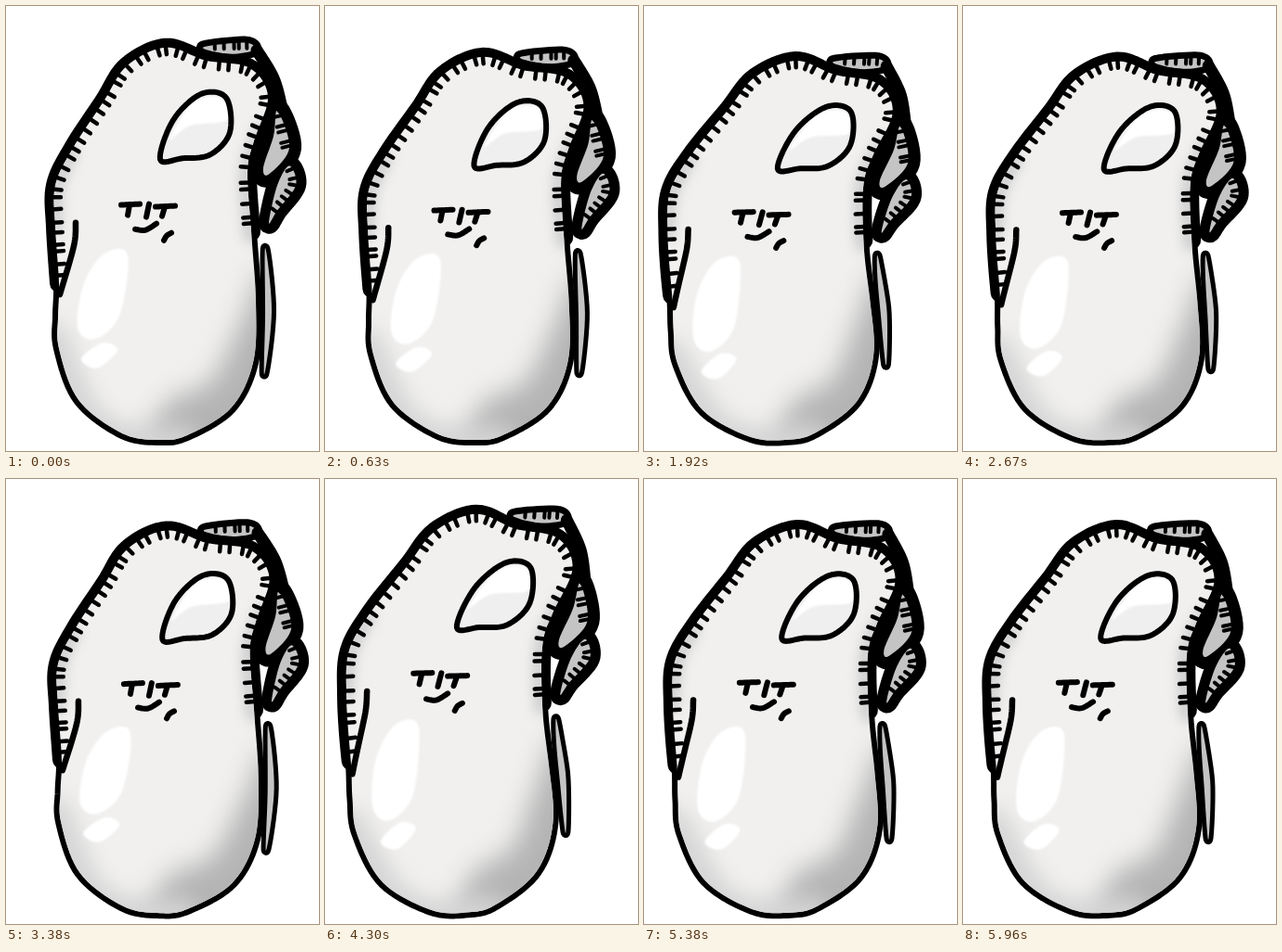
An HTML page with a canvas for the animation above (6000 ms loop, 337 px wide and 480 px high).

```html
<!DOCTYPE html>
<html lang="en">
<head>
<meta charset="utf-8">
<title>Dancing mitt</title>
<style>
html, body { margin: 0; height: 100%; overflow: hidden; background: #fff; }
canvas { display: block; }
</style>
</head>
<body>
<canvas id="stage" width="337" height="480"></canvas>
<script>
const ctx = document.getElementById('stage').getContext('2d');
const FPS = 24, LOOP = 6000, FLOOR = 474.5, TOP = 37.5, HIPS = 262;
let sway = 0, stretch = 1;

// The hips swing every 14 steps while the body bobs every 6.
function setPose(step) {
  sway = 18 * Math.cos((step - 12.2) * Math.PI / 7) - 12.4;
  const top = 40.5 + 10.8 * Math.cos((step - 4) * Math.PI / 3);
  stretch = (FLOOR - top) / (FLOOR - TOP);
}

// Bends the body like a soft beam; the upper half leans more than it turns.
function warp([x, y]) {
  const d = y - HIPS, w = 39200;
  const bend = Math.exp(-d * d / w);
  const turn = 2 * d / w * bend * (d < 0 ? 0.35 : 1);
  const turned = y + sway * turn * (x - 225 + 0.14 * y);
  return [x + sway * bend, FLOOR - (FLOOR - turned) * stretch];
}

// Catmull-Rom spline through "x,y x,y ..." as a dense list of points.
function spline(text, closed) {
  const p = text.trim().split(/\s+/).map(s => s.split(',').map(Number));
  const n = p.length, out = [];
  const at = i => closed ? p[(i + n) % n] : p[Math.max(0, Math.min(n - 1, i))];
  for (let i = 0; i < (closed ? n : n - 1); i++) {
    const [a, b, c, d] = [at(i - 1), at(i), at(i + 1), at(i + 2)];
    for (let t = 0; t < 1; t += 0.1) {
      out.push([0, 1].map(k => b[k] + 0.5 * t * (c[k] - a[k] +
        t * (2 * a[k] - 5 * b[k] + 4 * c[k] - d[k] +
        t * (3 * (b[k] - c[k]) + d[k] - a[k])))));
    }
  }
  if (!closed) out.push(p[n - 1]);
  return out;
}
const line = text => spline(text);
const shape = text => spline(text, true);

// Short stitches at right angles to a line, on its clockwise side.
function stitches(path, gap, len) {
  const out = [];
  let left = gap / 2;
  for (let i = 1; i < path.length; i++) {
    const [x, y] = path[i], dx = x - path[i - 1][0], dy = y - path[i - 1][1];
    const h = Math.hypot(dx, dy);
    left -= h;
    if (left < 0) {
      left += gap;
      out.push([[x + dy / h * 2, y - dx / h * 2], [x - dy / h * len, y + dx / h * len]]);
    }
  }
  return out;
}

function trace(path) {
  ctx.beginPath();
  path.forEach(p => ctx.lineTo(...warp(p)));
}
function fill(path, color) {
  trace(path);
  ctx.fillStyle = color;
  ctx.fill();
}
function stroke(path, width, color = '#000') {
  trace(path);
  ctx.lineWidth = width;
  ctx.strokeStyle = color;
  ctx.stroke();
}
function outline(path, width) {
  stroke([...path, path[0]], width);
}
function soft(radius, draw) {
  ctx.filter = `blur(${radius}px)`;
  draw();
  ctx.filter = 'none';
}

// The sewn part of the contour, then the smooth round bottom.
const sewn = `57,300 53,240 53,195 72,155 105,105 130,67 172,47 215,61 262,69
  282,100 267,147 260,180 264,245`;
const seam = line(sewn);
const body = shape(sewn + ` 269,320 266,385 242,434 195,463 165,468 125,461
  78,425 57,370 56,335`);
const bodyStitches = stitches(seam, 11.8, 7.5);

// Layers behind: [shape, width of the black border].
const layers = [
  [shape('212,47 258,42 267,50 240,54'), 7],
  [shape('292,115 305,155 283,183 277,176 288,142'), 13],
  [shape('305,174 312,195 292,222 283,235 292,195'), 11],
  [shape('279,262 286,330 278,398 279,335'), 5]
];
const fold = line('270,50 288,80 297,112');
const layerStitches = ['218,42 262,41', '294,113 306,160', '307,172 312,195 292,224']
  .flatMap(s => stitches(line(s), 9, 7));

const slit = line('75,235 73,260 58,312');
const shade = shape('285,290 252,345 220,405 172,430 160,490 310,490');
const rim = line('50,360 85,440 130,468 190,470');
const glows = [line('52,240 55,195 70,160'), line('263,250 259,180 275,135')];
const shine = shape('106,268 131,270 122,335 95,360 77,347 84,300');
const spot = shape('81,381 104,364 120,372 98,391');
const nail = shape('166,167 180,125 210,97 237,101 241,138 220,162 190,166');
const gloss = shape('176,146 202,106 233,102 238,125 198,131');
const face = [
  '124,216 144,215', '133,216 131,227', '154,215 151,229', '161,218 182,217',
  '171,218 168,228', '139,242 150,243 162,236', '178,246 173,249 170,254'
].map(line);

function draw() {
  ctx.fillStyle = '#fff';
  ctx.fillRect(0, 0, 337, 480);
  ctx.lineCap = ctx.lineJoin = 'round';

  layers.forEach(([path, border]) => outline(path, border * 2));
  layers.forEach(([path]) => fill(path, '#c4c4c4'));
  layerStitches.forEach(s => stroke(s, 4));
  stroke(fold, 13);

  stroke(seam, 20);
  outline(body, 12);
  fill(body, '#f1f0ef');
  ctx.save();
  ctx.clip();
  soft(14, () => fill(shade, '#b4b4b4'));
  soft(11, () => stroke(rim, 34, '#d4d4d4'));
  soft(6, () => glows.forEach(g => stroke(g, 16, '#d0d0d0')));
  ctx.restore();

  bodyStitches.forEach(s => stroke(s, 4.5));
  stroke(slit, 6.5);
  soft(1, () => {
    fill(shine, '#fff');
    fill(spot, '#fff');
  });

  fill(nail, '#efefef');
  soft(1, () => fill(gloss, '#fff'));
  outline(nail, 6);
  face.forEach(f => stroke(f, 6));
}

const start = performance.now();
function tick() {
  const time = (performance.now() - start) % LOOP;
  // Steps fall on the nearest hundredth of a second.
  setPose(Math.floor((time + 4) * FPS / 1000) % 144);
  draw();
  requestAnimationFrame(tick);
}
tick();
</script>
</body>
</html>
```
